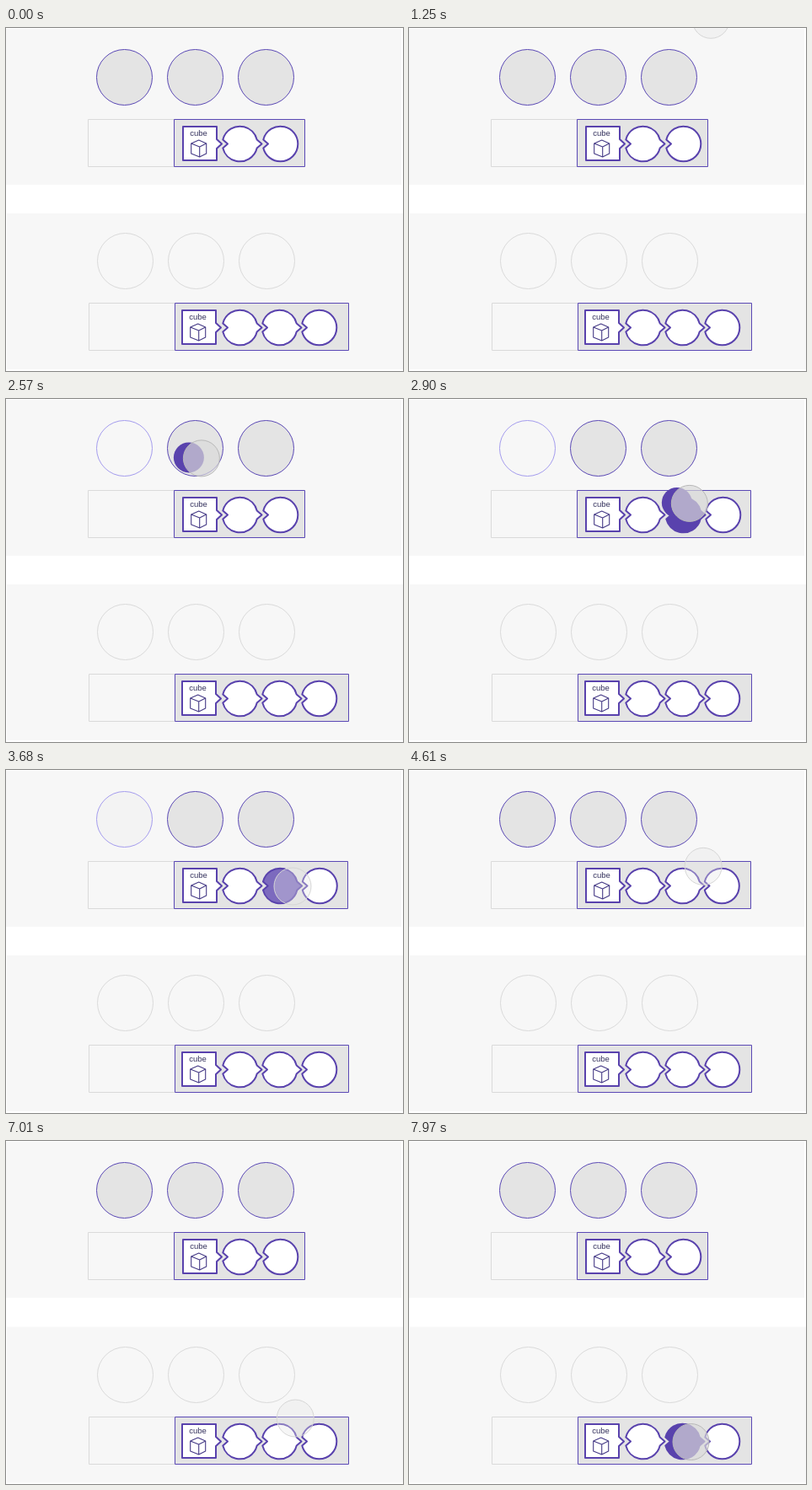
Write an HTML page with a canvas that moves like this. It is 471 px wide and 407 px high and loops after 8000 ms.

```html
<!DOCTYPE html>
<html>
<head>
<meta charset="utf-8">
<style>
html, body { margin: 0; overflow: hidden; background: #fff; }
canvas { display: block; }
</style>
</head>
<body>
<canvas id="stage" width="471" height="407"></canvas>
<script>
const ctx = document.getElementById('stage').getContext('2d');
const PURPLE = '#5942ad', GRAY = '#e4e4e4', PALE = '#dadada', PANEL = '#f7f7f7';

const clamp = v => Math.max(0, Math.min(1, v));
const span = (t, from, to) => clamp((t - from) / (to - from));
const smooth = u => u * u * (3 - 2 * u);
const easeOut = (u, power) => 1 - (1 - u) ** power;
const mix = (a, b, u) => a + (b - a) * u;

function paint(fill, stroke, width = 1, alpha = 1) {
  if (fill) {
    ctx.save();
    ctx.globalAlpha *= alpha;
    ctx.fillStyle = fill;
    ctx.fill();
    ctx.restore();
  }
  if (stroke) {
    ctx.strokeStyle = stroke;
    ctx.lineWidth = width;
    ctx.stroke();
  }
}

function disc(x, y, r, fill, stroke, alpha) {
  ctx.beginPath();
  ctx.arc(x, y, r, 0, Math.PI * 2);
  paint(fill, stroke, 1, alpha);
}

function box(x, y, w, h, fill, stroke) {
  ctx.beginPath();
  ctx.rect(x, y, w, h);
  paint(fill, stroke);
}

function poly(...points) {
  points.forEach(([x, y], i) => i ? ctx.lineTo(x, y) : ctx.moveTo(x, y));
}

// Round socket: notch on the left, optional arrow on the right.
function slot(x, y, arrow, tint) {
  const a = 0.24;
  ctx.beginPath();
  ctx.moveTo(x - 14.5, y);
  ctx.arc(x, y, 20.8, Math.PI + a, arrow ? -a : 0);
  if (arrow) ctx.lineTo(x + 26, y);
  ctx.arc(x, y, 20.8, arrow ? a : 0, Math.PI - a);
  ctx.closePath();
  paint('#fff');
  paint(PURPLE, PURPLE, 2, tint);
}

function cubeBlock(x, y) {
  ctx.beginPath();
  poly([x, y], [x + 40, y], [x + 40, y + 15], [x + 46, y + 20.5], [x + 40, y + 26],
    [x + 40, y + 40], [x, y + 40]);
  ctx.closePath();
  ctx.lineJoin = 'round';
  paint('#fff', PURPLE, 2);
  ctx.fillStyle = '#33305c';
  ctx.font = '9.5px "Liberation Sans", Arial, sans-serif';
  ctx.textAlign = 'center';
  ctx.fillText('cube', x + 18.5, y + 11);
  const cx = x + 18.7, top = y + 16;
  ctx.beginPath();
  poly([cx, top], [cx + 9, top + 4], [cx + 9, top + 16], [cx + 1, top + 20],
    [cx - 9, top + 16], [cx - 9, top + 4]);
  ctx.closePath();
  poly([cx - 9, top + 4], [cx + 1, top + 8], [cx + 9, top + 4]);
  poly([cx + 1, top + 8], [cx + 1, top + 20]);
  paint(null, '#453a86', 1.1);
}

function row(x, y, right, slots) {
  box(x, y, 102, 56, PANEL, PALE);
  box(x + 102, y, right - x - 102, 56, GRAY, '#5a48b5');
  cubeBlock(x === 97.5 ? 210 : 209, y + 8.5);
  slots.forEach(([sx, tint], i) => slot(sx, y + 29, i < slots.length - 1, tint));
}

function pointerAt(t) {
  if (t < 1220) return null;
  if (t < 2180) {
    const u = span(t, 1220, 2000);
    return { x: mix(377, 156, easeOut(u, 2.2)), y: mix(-22, 60, easeOut(u, 4)) };
  }
  if (t < 4490) return {
    x: mix(156, 340, smooth(span(t, 2240, 2990))),
    y: mix(60, 138, smooth(span(t, 2420, 3080))),
    pressed: t < 3620
  };
  if (t < 4760) {
    const u = span(t, 4490, 4730) ** 2.8;
    return { x: mix(340, 402, u), y: mix(138, -23, u) };
  }
  if (t < 6230) return null;
  const u = span(t, 6230, 7370);
  return {
    x: mix(492, 334.5, easeOut(u, 2.5)),
    y: mix(238, 357, smooth(u)),
    pressed: t >= 7970
  };
}

function draw(t) {
  const pointer = pointerAt(t);
  const hover = (x, y, r) => pointer && !pointer.pressed
    ? 0.36 * clamp((r - Math.hypot(pointer.x - x, pointer.y - y)) / 5) : 0;
  const reset = span(t, 5420, 5690);
  const shift = reset;

  ctx.clearRect(0, 0, 471, 407);
  box(0, 1, 469, 185, PANEL);
  box(1, 220 + shift * 0.5, 470, 185, PANEL);

  // Upper panel
  [140.5, 224.5, 308.5].forEach((x, i) => {
    const taken = i === 0 && t >= 2180 && t < 3900;
    const filled = taken ? span(t, 3620, 3900) : 1;
    disc(x, 58.5, 33, GRAY, null, filled);
    disc(x, 58.5, 33, PURPLE, filled < 0.5 ? '#a49cee' : '#5a48b5',
      taken ? 0 : hover(x, 58.5, 33));
  });

  const open = smooth(span(t, 2730, 2830));
  const settled = span(t, 3620, 3800);
  if (open && reset < 1) {
    const x = mix(325.5, 324.5, settled);
    const tint = mix(1, hover(x, 137.5, 21), settled);
    row(97.5, 108.5, mix(354.5, 405.5, open),
      [[277.5, hover(277.5, 137.5, 21)], [x, tint],
       [mix(325.5, mix(372.5, 371, settled), open), hover(371, 137.5, 21)]]);
  }
  if (!open || reset) {
    ctx.save();
    if (open) {
      ctx.globalAlpha = reset;
      box(354, 108, 53, 58, PANEL);
    }
    row(97.5, 108.5, 354.5, [[277.5, 0], [325.5, 0]]);
    ctx.restore();
  }

  // Lower panel
  [141.5, 225.5, 309.5].forEach(x => disc(x, 276.5 + shift, 33, null, PALE));
  row(98.5, 326.5 + shift, 406.5, [277.5, 324.5, 371.5].map((x, i) =>
    [x, t >= 7970 && i === 1 ? 1 : hover(x, 356.5, 21)]));

  if (!pointer) return;
  const { x, y, pressed } = pointer;
  if (pressed && t < 3620) {
    disc(x - 15, y - 1, mix(33, 18, smooth(span(t, 2180, 2330))), PURPLE);
  }
  if (pressed) disc(x, y, 21.5, 'rgba(219,219,219,.68)', '#b8b8b8');
  else disc(x, y, 22, 'rgba(230,230,230,.35)', '#d6d6d6');
}

function tick(now) {
  draw(now % 8000);
  requestAnimationFrame(tick);
}
requestAnimationFrame(tick);
</script>
</body>
</html>
```
